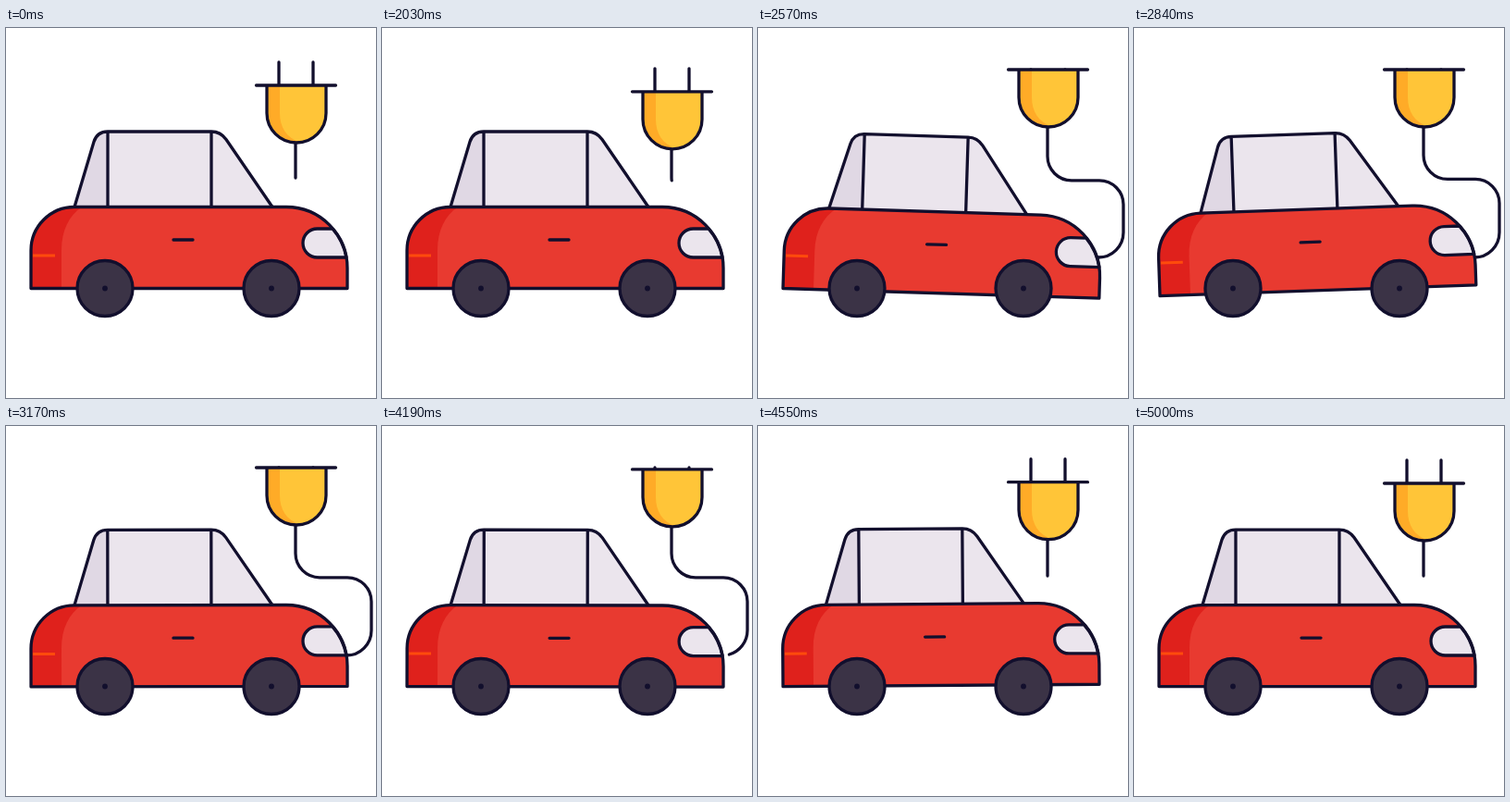
An HTML page that plays this animation: 400 by 400 pixels, repeating every 5.03 s.

```html
<!DOCTYPE html>
<html lang="en">
<head>
<meta charset="utf-8">
<title>Electric car</title>
<style>
  html, body { margin: 0; width: 100%; height: 100%; overflow: hidden; background: #fff; }
  svg { display: block; width: 100vw; height: 100vh; }
  .line { fill: none; stroke: #120f2d; stroke-width: 3.3; stroke-linecap: round; stroke-linejoin: round; }
</style>
</head>
<body>
<svg viewBox="0 0 400 400">
  <path id="cable" class="line"/>

  <g id="car">
    <path fill="#ebe5ed" d="M74 193.5 L95 123 Q98.500 112 110 112 H222 Q232 112 238 120.500 L288 193.500Z"/>
    <path fill="#e0d8e4" d="M74 193.5 L95 123 Q98.500 112 110 112 V193.500Z"/>
    <path class="line" d="M74 193.5 L95 123 Q98.500 112 110 112 H222 Q232 112 238 120.500 L288 193.500 M110 112 V193.500 M222 112 V193.500"/>
    <path fill="#df211c" d="M27 281.500 V240.500 A47 47 0 0 1 74 193.500 H110 V281.500Z"/>
    <path fill="#e83a30" d="M60 281.500 V240 C60 219 68 203 82 193.500 H303 A66 66 0 0 1 369 259.500 V281.500Z"/>
    <path d="M29 246 H53" stroke="#ff4b0c" stroke-width="3"/>
    <path class="line" style="fill:#ebe5ed" d="M353 217 H336.500 A15.500 15.500 0 0 0 336.500 248 H368 A66 66 0 0 0 353 217Z"/>
    <path class="line" d="M27 281.500 V240.500 A47 47 0 0 1 74 193.500 H303 A66 66 0 0 1 369 259.500 V281.500Z M181 229 H202"/>
  </g>

  <g class="line" style="fill:#3b3346">
    <circle cx="107" cy="281.500" r="30"/>
    <circle cx="287" cy="281.500" r="30"/>
  </g>
  <g fill="#120f2d">
    <circle cx="107" cy="281.500" r="2.900"/>
    <circle cx="287" cy="281.500" r="2.900"/>
  </g>

  <g id="plug">
    <path id="prongs" class="line"/>
    <path fill="#ffab27" d="M282 62 V92 A32 32 0 0 0 346 92 V62Z"/>
    <path fill="#ffc538" d="M296 62 V92 C296 107 303 119 318 123.500 A32 32 0 0 0 346 92 V62Z"/>
    <path class="line" d="M282 62 V92 A32 32 0 0 0 346 92 V62 M270.500 62 H356.500"/>
  </g>
</svg>
<script>
  const LOOP = 5030;
  const [cable, car, plug, prongs] = ['cable', 'car', 'plug', 'prongs'].map(id => document.getElementById(id));

  const linear = p => p;
  const sine = p => (1 - Math.cos(Math.PI * p)) / 2;
  const quadOut = p => p * (2 - p);

  // Steps are [time, value, easing towards this value].
  function track(steps, t) {
    if (t <= steps[0][0]) return steps[0][1];
    for (let i = 1; i < steps.length; i++) {
      const [t0, v0] = steps[i - 1];
      const [t1, v1, ease = sine] = steps[i];
      if (t < t1) return v0 + (v1 - v0) * ease((t - t0) / (t1 - t0));
    }
    return steps[steps.length - 1][1];
  }

  const plugY = [[2000, 0], [2100, 13, quadOut], [2360, -17], [4160, -17], [4700, 0, quadOut]];
  const prongLength = [[2180, 25], [2360, 0], [4160, 0], [4550, 25, linear]];
  const cableOut = [[2000, 0], [2360, 1], [4160, 1], [4550, 0, linear]];
  const front = [[2360, 0], [2560, 10.7], [2800, -3.7], [3215, 0]];
  const rear = [[2740, 0], [2850, 8.3], [3225, 0]];
  const OUT_DELAY = 1800;

  function draw(t) {
    const bounceTime = t < 4160 ? t : t - OUT_DELAY;
    const f = track(front, bounceTime);
    const r = track(rear, bounceTime);
    const tilt = Math.atan((f - r) / 342) * 180 / Math.PI;
    car.setAttribute('transform', `translate(${r / 8} ${r}) rotate(${tilt} 27 281.5)`);

    plug.setAttribute('transform', `translate(0 ${track(plugY, t)})`);
    const top = 62 - track(prongLength, t);
    prongs.setAttribute('d', `M295 62 V${top} M332 62 V${top}`);

    // The first bend rises to its place as the cable pays out.
    const e = track(cableOut, t);
    const y = 163.8 + 25 * Math.max(0, 1 - 3 * e) + f * 0.1;
    cable.setAttribute('d', `M313 95 V${y - 26} A26 26 0 0 0 339 ${y} H369 A26 26 0 0 1 395 ${y + 26} V221 A27 27 0 0 1 368 248 H363`);
    const total = cable.getTotalLength();
    cable.setAttribute('stroke-dasharray', `${67 + (total - 67) * e} 900`);
  }

  const start = performance.now();
  function tick(now) {
    draw(Math.max(0, now - start) % LOOP);
    requestAnimationFrame(tick);
  }
  draw(0);
  requestAnimationFrame(tick);
</script>
</body>
</html>
```
